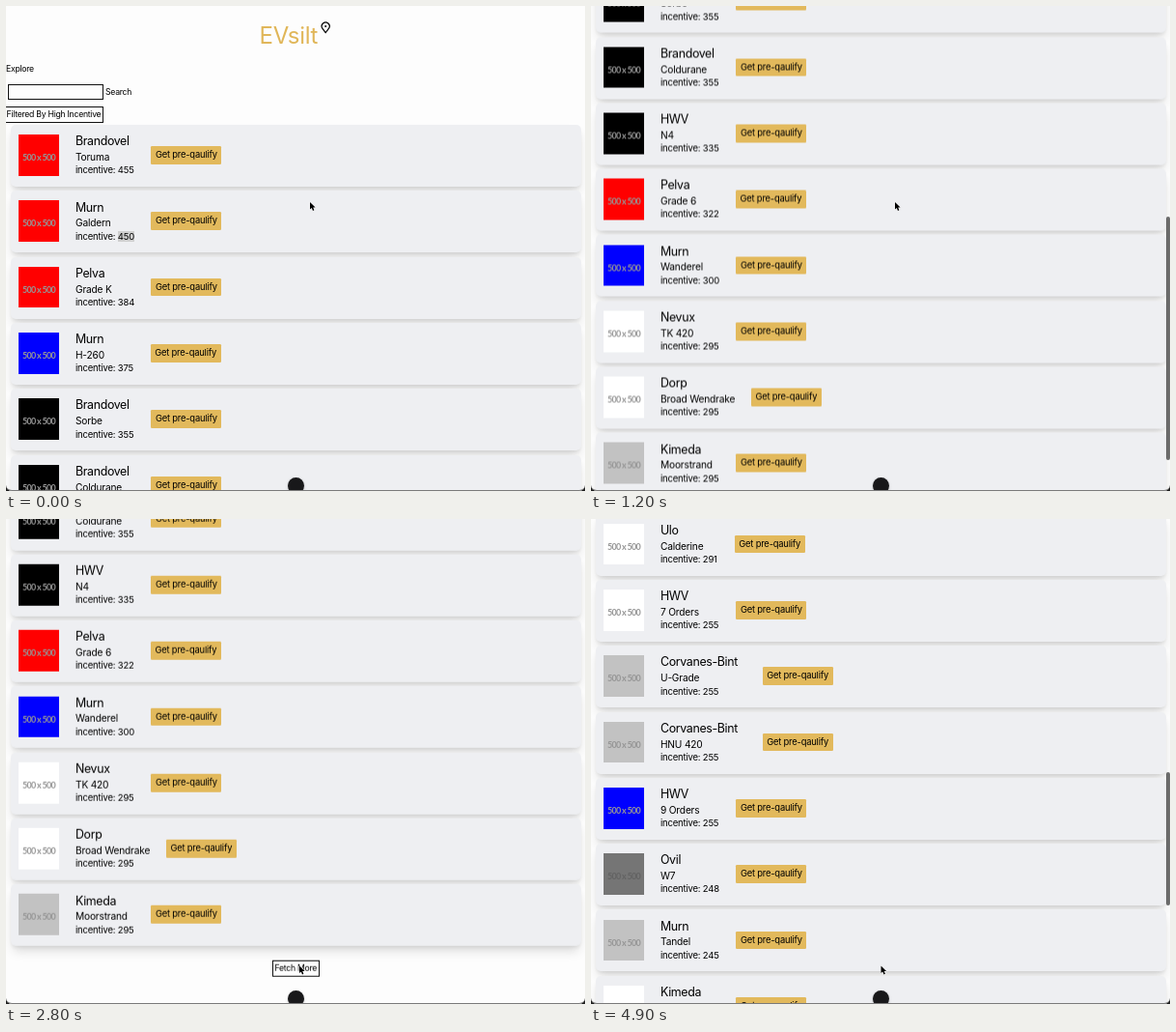
Animation, 600 px wide and 502 px high, one loop 5 s. Source, as an HTML page:

```html
<!DOCTYPE html>
<html lang="en">
<head>
<meta charset="utf-8">
<title>Incentives</title>
<style>
html, body { margin: 0; width: 100%; height: 100%; overflow: hidden; background: #fdfdfd; }
#stage { position: relative; width: 600px; height: 502px; overflow: hidden;
  font: 8.7px/12px Inter, sans-serif; letter-spacing: -.28px; color: #000; white-space: nowrap; }
#stage div, #stage svg { position: absolute; box-sizing: border-box; }
#page { left: 0; top: 0; width: 600px; will-change: transform; }
#brand { left: 262.5px; top: 14.5px; font-size: 24px; line-height: 32px; letter-spacing: -.3px; color: #e0b658; }
.box { border: 1.33px solid #111; height: 17px; line-height: 14.4px; text-align: center; }
.card { left: 5px; width: 590.5px; height: 64px; border-radius: 5px; background: #eeeff2;
  box-shadow: 0 8px 12px -2px #00000020, 0 2.7px 4px -1.3px #00000018; }
.pic { left: 7.7px; top: 10.2px; width: 42.7px; height: 42.7px; color: #969696; text-align: center;
  font: 700 9px/47px Lato, sans-serif; letter-spacing: -.7px; }
.make { left: 67px; top: 8.3px; font-size: 12.4px; line-height: 18px; letter-spacing: -.35px; }
.model { left: 67px; top: 26px; font-size: 10.2px; line-height: 14px; letter-spacing: -.2px; }
.sum { left: 67px; top: 40.4px; font-size: 9.5px; line-height: 14px; letter-spacing: -.2px; }
.sum span { background: #d0d0d0; }
.get { top: 22.2px; width: 73.3px; height: 18.7px; border-radius: 1.3px; background: #e2b95c;
  font-size: 9.4px; line-height: 18.7px; letter-spacing: -.2px; text-align: center; }
#bar { left: 596px; width: 4px; border-radius: 2px; background: #6b6b6b; }
#badge { left: 291.5px; top: 488px; width: 17px; height: 17px; border-radius: 50%; background: #18181a;
  box-shadow: 0 1px 3px #0004; }
#frame { inset: 0; border-bottom: 1px solid #7a7a7a; border-radius: 0 0 6px 6px; box-shadow: 0 0 0 9px #1a1a1a; }
</style>
</head>
<body>
<div id="stage">
  <div id="page">
    <div id="brand">EVsilt</div>
    <svg style="left:326px;top:16px" width="11" height="13" fill="none" stroke="#000" stroke-width="1.2">
      <path d="M5.2 11.6 2 7.4A4 4 0 1 1 8.4 7.4Z"/><circle cx="5.2" cy="5" r="1" fill="#000" stroke="none"/>
    </svg>
    <div style="left:0;top:59px">Explore</div>
    <div class="box" style="left:2px;top:80.5px;width:98.7px;height:16.5px;border-width:1px"></div>
    <div style="left:103px;top:82.5px">Search</div>
    <div class="box" style="left:-2px;top:103.5px;width:103px">Filtered By High Incentive</div>
    <div class="box" id="more" style="left:276px;width:48.5px">Fetch More</div>
  </div>
  <div id="bar"></div>
  <div id="badge"></div>
  <svg id="cursor" width="12" height="14" style="overflow:visible" stroke-linejoin="round">
    <path id="arrow" d="M0 0V7.6L1.8 6 3 8.9 4.4 8.3 3.2 5.5H5.6Z" fill="#000" stroke="#fff" stroke-width=".8" paint-order="stroke"/>
    <path id="hand" d="M-1-4.5Q0-5.3 .7-4.5V-1L3.8-.2Q4.6 0 4.4 1L3.6 4.5H-.6L-3 1.2Q-2.7 0-1 1.2Z" fill="#fff" stroke="#000" stroke-width=".8"/>
  </svg>
  <div id="frame"></div>
</div>
<script>
const $ = id => document.getElementById(id);
const PITCH = 68.3, TOP = 123, VIEW = 502;
const SILVER = '#c2c2c2', GRAY = '#757575';

// make, model, incentive, picture colour, button x
const cars = [
  ['Brandovel', 'Toruma', 455, '#f00'],
  ['Murn', 'Galdern', 450, '#f00'],
  ['Pelva', 'Grade K', 384, '#f00'],
  ['Murn', 'H-260', 375, '#00f', 149.5],
  ['Brandovel', 'Sorbe', 355, '#000'],
  ['Brandovel', 'Coldurane', 355, '#000'],
  ['HWV', 'N4', 335, '#000'],
  ['Pelva', 'Grade 6', 322, '#f00', 149.8],
  ['Murn', 'Wanderel', 300, '#00f'],
  ['Nevux', 'TK 420', 295, '#fff'],
  ['Dorp', 'Broad Wendrake', 295, '#fff', 165.7],
  ['Kimeda', 'Moorstrand', 295, SILVER],
  ['Ulo', 'Calderine', 291, '#fff', 148.6],
  ['HWV', '7 Orders', 255, '#fff'],
  ['Corvanes-Bint', 'U-Grade', 255, SILVER, 177.5],
  ['Corvanes-Bint', 'HNU 420', 255, SILVER, 177.5],
  ['HWV', '9 Orders', 255, '#00f'],
  ['Ovil', 'W7', 248, GRAY],
  ['Murn', 'Tandel', 245, SILVER],
  ['Kimeda', 'Lumeran', 245, '#fff']
];

const cards = cars.map(([make, model, sum, color, x = 150.2], i) => {
  const card = document.createElement('div');
  card.className = 'card';
  card.style.top = TOP + PITCH * i + 'px';
  card.innerHTML = `
    <div class="pic" style="background:${color}${color === GRAY ? ';color:#636363' : ''}">500 x 500</div>
    <div class="make">${make}</div>
    <div class="model">${model}</div>
    <div class="sum">incentive: ${i === 1 ? `<span>${sum}</span>` : sum}</div>
    <div class="get" style="left:${x - 5}px">Get pre-qaulify</div>`;
  $('page').append(card);
  return card;
});

// keys are [time, value...]
const scrollKeys = [[300, 0], [500, 40], [600, 90], [900, 275], [1100, 390], [1300, 475], [1400, 496],
  [1500, 498.3], [2000, 496.3], [3200, 496.3], [3300, 560], [3500, 790], [3600, 890], [3700, 921],
  [3900, 911], [4100, 907], [4500, 907], [4700, 914], [4900, 948]];
const cursorKeys = [[1200, 315, 203], [1500, 343, 472], [1900, 343, 472], [2300, 304, 462.5],
  [3100, 304, 462.5], [3400, 297.7, 464], [4300, 297.7, 464], [4700, 300.5, 462.5]];
const barKeys = [[200, 0], [300, 1], [1900, 1], [2300, 0], [3100, 0], [3200, 1], [4900, 1]];

function at(keys, t) {
  const k = keys.findIndex(p => p[0] > t);
  if (k < 1) return (k ? keys[keys.length - 1] : keys[0]).slice(1);
  const a = keys[k - 1], b = keys[k], u = (t - a[0]) / (b[0] - a[0]);
  return a.slice(1).map((v, j) => v + (b[j + 1] - v) * u);
}

function draw(t) {
  const [y] = at(scrollKeys, t), [cx, cy] = at(cursorKeys, t);
  const count = t < 3100 ? 12 : t < 4300 ? 18 : 24;
  const height = 998 + (count - 12) * PITCH;
  const thumb = VIEW * VIEW / height - 1;
  const over = t >= 3800 && t < 4300;

  $('page').style.transform = `translateY(${-y}px)`;
  cards.forEach((card, i) => card.hidden = i >= count);
  $('more').style.top = TOP + PITCH * count + 10.5 + 'px';
  Object.assign($('bar').style, {
    top: Math.min(y / height * VIEW + .5, 500 - thumb) + 'px',
    height: thumb + 'px',
    opacity: at(barKeys, t)[0]
  });
  $('cursor').style.transform = `translate(${cx}px,${cy}px)`;
  $('arrow').style.display = over ? 'none' : '';
  $('hand').style.display = over ? '' : 'none';
}

function tick() {
  draw(Math.floor(performance.now() % 5000 / 100) * 100);
  requestAnimationFrame(tick);
}
tick();
</script>
</body>
</html>
```
